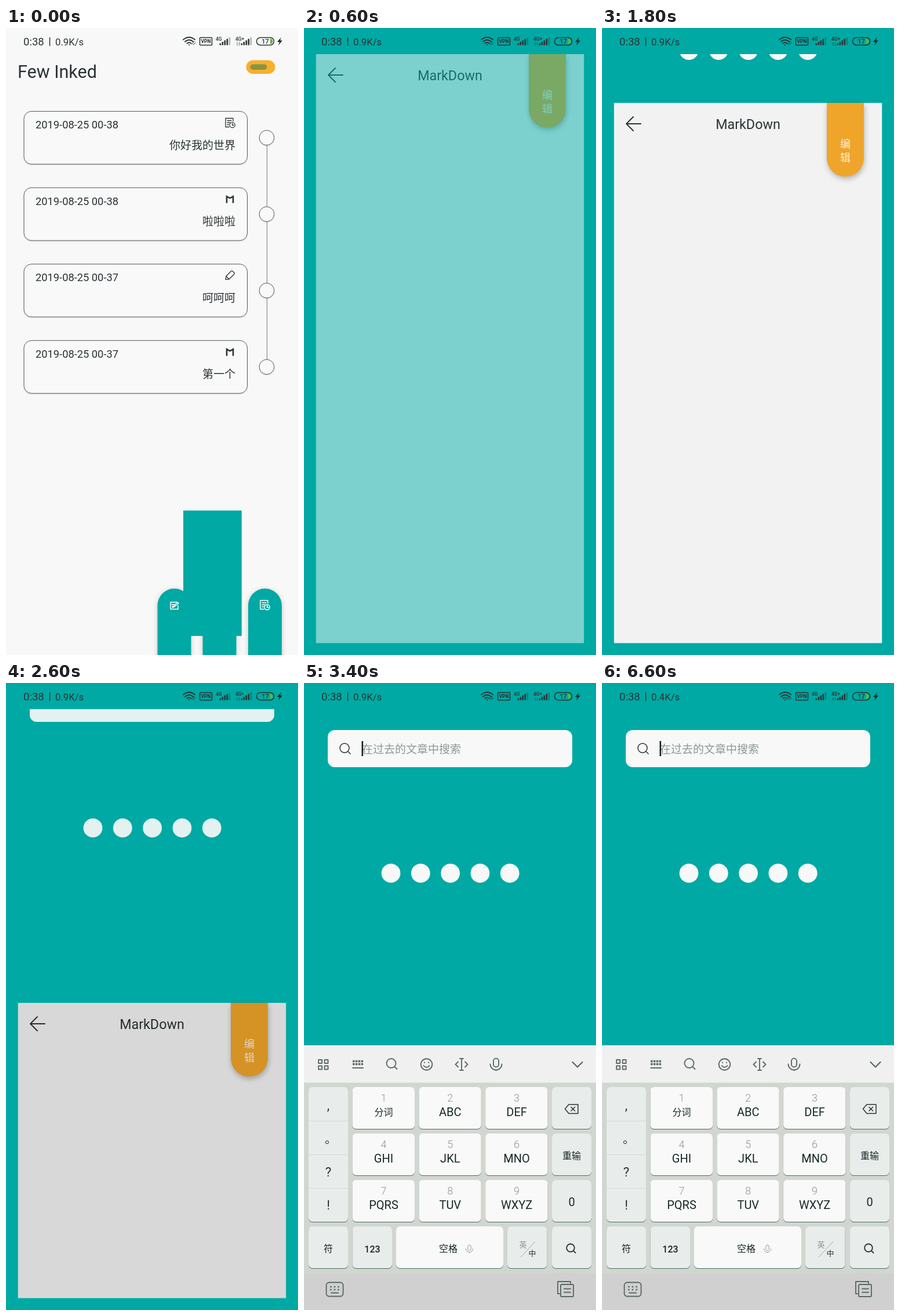
An HTML page that plays this animation: 504x1080 px, repeating every 6.8 s.

```html
<!DOCTYPE html>
<html lang="zh">
<head>
<meta charset="utf-8">
<title>Notes app</title>
<style>
  html, body { margin: 0; width: 100%; height: 100%; overflow: hidden; background: #f8f8f8; }
  svg { display: block; width: 504px; height: 1080px; }
  text { font-family: Roboto, "Noto Sans CJK SC", "Noto Sans CJK", sans-serif; fill: #2a3335; }
  .mid { text-anchor: middle; }
  .end { text-anchor: end; }
  .line { fill: none; stroke: #2a3335; stroke-width: 1.5; stroke-linecap: round; stroke-linejoin: round; }
  .white { stroke: #fff; }
  .teal { fill: #00a9a3; }
  .paper { fill: #f8f8f8; }
  .card { fill: #f9f9f9; stroke: #565c5b; stroke-width: 1; filter: drop-shadow(0 1px 1px #0002); }
  .pill { filter: drop-shadow(0 2px 4px #0003); }
  .tab { fill: #f4a92a; filter: drop-shadow(1px 4px 5px #0004); }
  .key { fill: #f9f9f9; filter: drop-shadow(0 1px .7px #4b706b); }
  .soft { fill: #e8ecea; }
  .digit { font-size: 18px; font-weight: 300; fill: #8d9392; }
  .label { font-size: 20px; fill: #152826; }
  .cjk { font-size: 16px; font-weight: 500; fill: #152826; }
  .tool { stroke: #5b6967; stroke-width: 1.9; }
</style>
</head>
<body>
<svg viewBox="0 0 504 1080">
  <defs>
    <clipPath id="below"><rect y="45" width="504" height="1035"/></clipPath>
    <clipPath id="frame"><rect x="20.5" y="45" width="463" height="1014.5"/></clipPath>
    <g id="todo">
      <path d="M14 6V1H1V16H7M4 5H11M4 8.500H9M4 12H6.500"/>
      <circle cx="12.700" cy="12.700" r="4.500"/>
      <path d="M12.700 10V13H15"/>
    </g>
    <path id="letter" d="M1 13V1.500L6.500 4.500L12 1.500V13" stroke-width="2.600" stroke-linecap="butt" stroke-linejoin="miter"/>
    <path id="pen" d="M1 16L2 10L10.500 1.500Q12 .5 13.500 2L15.500 4Q17 5.500 15.500 7L7 15.500ZM2 10L7 15.500"/>
    <g id="lens"><circle r="8"/><path d="M6 6L10 10"/></g>
    <g id="mic"><rect x="-4.500" y="-11" width="9" height="15" rx="4.500"/><path d="M-10 -1A10 10 0 0 0 10 -1M0 9V10"/></g>
  </defs>

  <rect class="paper" width="504" height="1080"/>
  <g id="home">
    <text x="20" y="86" font-size="30.500">Few Inked</text>
    <rect x="414.500" y="55.500" width="50" height="23.500" rx="11.750" fill="#fbae2b"/>
    <rect x="421.500" y="62.500" width="29" height="9.500" rx="4.750" fill="#879541"/>
    <path d="M450.500 189V584" stroke="#777c7b"/>
    <g id="cards"></g>
    <g class="teal">
      <rect class="pill" x="261.500" y="965.500" width="58" height="160" rx="29"/>
      <rect class="pill" x="339.500" y="965.500" width="58" height="160" rx="29"/>
      <rect class="pill" x="418" y="965.500" width="58" height="160" rx="29"/>
    </g>
    <path class="line white" d="M295 989H284V1001H297V995M287 998L296 989L298 991L289 998ZM286 993H290M287 996H289"/>
    <use href="#todo" class="line white" x="438" y="985"/>
  </g>

  <rect id="cover" class="teal" width="504" height="1080"/>

  <g clip-path="url(#below)">
    <g id="search">
      <rect class="paper" x="41" y="81" width="422" height="64" rx="12"/>
      <use href="#lens" class="line" x="70" y="112"/>
      <text x="100" y="120.500" font-size="19" style="fill:#8d9997">在过去的文章中搜索</text>
      <rect id="caret" x="99.500" y="100" width="2.600" height="26" fill="#17211f"/>
      <g id="dots" class="paper"></g>
    </g>
  </g>

  <g id="editor" clip-path="url(#frame)">
    <g id="page">
      <rect class="paper" x="20.500" y="45" width="463" height="1015"/>
      <path class="line" style="stroke-width:1.900" d="M67 81H42L54 69M42 81L54 93"/>
      <text class="mid" x="252" y="90" font-size="23.300">MarkDown</text>
      <path class="tab" d="M388 45H452V140A32 32 0 0 1 388 140Z"/>
      <g class="mid" font-size="18">
        <text x="420" y="122" style="fill:#fdf6e8">编</text>
        <text x="420" y="146" style="fill:#fdf6e8">辑</text>
      </g>
      <rect id="shade" x="20.500" y="45" width="463" height="1015"/>
    </g>
  </g>

  <g id="keyboard">
    <rect y="624" width="504" height="456" fill="#d2d6d0"/>
    <rect y="624" width="504" height="64.500" fill="#f0f0f0"/>
    <rect y="1017" width="504" height="63" fill="#d0d0d0"/>
    <g class="line tool">
      <path d="M25 649H31V655H25ZM35.500 649H41.500V655H35.500ZM25 659.500H31V665.500H25ZM35.500 659.500H41.500V665.500H35.500Z"/>
      <path d="M84 651.500H102M84 656.500H102" stroke-width="3.500" stroke-dasharray="3.500 1.350" stroke-linecap="butt"/>
      <path d="M84 663H102"/>
      <use href="#lens" x="150.500" y="655"/>
      <circle cx="211.500" cy="657" r="9.800"/>
      <path d="M208 653.500V654M215 653.500V654M206.500 659Q211.500 665 216.500 659"/>
      <path d="M269 647H275M272 647V667M269 667H275M266 652.500L261.500 657L266 661.500M278 652.500L282.500 657L278 661.500"/>
      <use href="#mic" x="331.500" y="657.500"/>
      <path d="M463.500 653L472 661.500L480.500 653" stroke-width="2.300"/>
      <rect x="38.500" y="1032.500" width="29" height="24" rx="5"/>
      <path d="M45 1040H61M45 1045H61" stroke-width="2.600" stroke-dasharray="2.600 4" stroke-linecap="butt"/>
      <path d="M47 1050.500H59"/>
      <path d="M441 1052H438V1031H460V1034"/>
      <rect x="443" y="1036" width="22" height="21" rx="2"/>
      <path d="M449 1043.500H460M449 1049.500H460"/>
    </g>
    <g id="keys"></g>
    <path d="M8 754.500H76M8 812.500H76M8 870.500H76" stroke="#d3d9d6"/>
    <g class="mid" font-size="22">
      <text x="42" y="735">,</text>
      <text x="46" y="793" font-size="20">。</text>
      <text x="42" y="850">?</text>
      <text x="42" y="907">!</text>
    </g>
    <path class="line" stroke-width="1.800" d="M450.500 733.500L457 726H473V741.500H457ZM461 730.500L467.500 737M467.500 730.500L461 737"/>
    <use href="#mic" class="line" style="stroke:#8d9392" transform="translate(285.500 975) scale(.62)"/>
    <path d="M374 989L399 962" stroke="#a3a8a6"/>
    <text class="mid" x="378" y="972" font-size="13" style="fill:#8d9392">英</text>
    <text class="mid" x="394" y="987" font-size="13" font-weight="500">中</text>
    <use href="#lens" class="line" style="stroke-width:2.200" transform="translate(460 973) scale(.85)"/>
  </g>

  <g id="status">
    <text x="30" y="29.500" font-size="18.500">0:38</text>
    <path d="M75.500 16V31" stroke="#2a3335" stroke-width="1.500"/>
    <text id="speed" x="85" y="29.500" font-size="16.700"></text>
    <g class="line">
      <path stroke-width="2" d="M306 20Q316 12 326 20M309 23.500Q316 17.500 323 23.500M312.500 26.500Q316 23.500 319.500 26.500M316 29V29.200"/>
      <path stroke-width="1" d="M321 28L325 23M323.500 29L327 25"/>
      <rect x="334.500" y="16.500" width="21" height="13" rx="1"/>
      <rect x="432.500" y="16.500" width="30" height="13" rx="6.500"/>
    </g>
    <text class="mid" x="345" y="26.200" font-size="8.500" font-weight="700">VPN</text>
    <text x="362" y="21.500" font-size="8.500" font-weight="500">4G</text>
    <text x="396" y="21.500" font-size="8.500" font-weight="500">4G+</text>
    <g id="bars" fill="#2a3335"></g>
    <path d="M399 25V30M402.500 25V30" stroke="#2a3335" stroke-dasharray="2 1"/>
    <path d="M456 18.500A4.500 4.500 0 0 1 456 27.500Z" fill="#62b82e"/>
    <text class="mid" x="447.500" y="27" font-size="11" font-weight="500">17</text>
    <path d="M475 16L468 24H472L470 30L477 21.500H473Z" fill="#202829"/>
  </g>
</svg>

<script>
const LOOP = 6800, STEP = 200;
const el = id => document.getElementById(id);
const fill = (id, items, draw) => el(id).innerHTML = items.map(draw).join('');

fill('cards', [
  ['38', '你好我的世界', 'todo', 378, 154.5],
  ['38', '啦啦啦', 'letter', 380, 157],
  ['37', '呵呵呵', 'pen', 378, 154],
  ['37', '第一个', 'letter', 380, 157]
], ([minute, note, icon, x, y], i) => `<g transform="translate(0 ${i * 131.6})">
  <rect class="card" x="31" y="143.5" width="385.5" height="91" rx="13"/>
  <text x="51" y="173" font-size="18.3">2019-08-25 00-${minute}</text>
  <use href="#${icon}" class="line" style="stroke-width:${icon === 'letter' ? 2.6 : 1.3}" x="${x}" y="${y}"/>
  <text class="end" x="396" y="208.500" font-size="19">${note}</text>
  <circle class="card" cx="450" cy="189" r="12.8"/></g>`);

fill('dots', [0, 1, 2, 3, 4], i => `<circle cx="${150 + i * 51.3}" cy="327.7" r="16.400"/>`);

fill('bars', [368.5, 405.5], x => [0, 1, 2, 3, 4].map(i =>
  `<rect x="${x + i * 4}" y="${26.5 - i * 2.6}" width="2.600" height="${3 + i * 2.6}" opacity="${i > 3 ? .35 : 1}"/>`).join(''));

const key = (x, y, w, h = 72, soft = true) =>
  `<rect class="key ${soft ? 'soft' : ''}" x="${x}" y="${y}" width="${w}" height="${h}" rx="6.5"/>`;
const label = (x, y, text, kind) => `<text class="mid ${kind}" x="${x}" y="${y}">${text}</text>`;

const letters = ['分词', 'ABC', 'DEF', 'GHI', 'JKL', 'MNO', 'PQRS', 'TUV', 'WXYZ'];
fill('keys', letters, (text, i) => {
  const x = 83.5 + i % 3 * 114.8, y = 696 + Math.floor(i / 3) * 80;
  return key(x, y, 107.5, 72, false) + label(x + 54, y + 25, i + 1, 'digit')
    + label(x + 54, y + (i ? 50 : 48.5), text, i ? 'label' : 'cjk');
});
el('keys').innerHTML += key(8, 696, 68, 232)
  + [696, 776, 856, 936].map(y => key(428, y, 68)).join('')
  + key(8, 936, 68) + key(83.5, 936, 68.5) + key(159, 936, 185, 72, false) + key(351, 936, 68.5)
  + label(462, 820, '重输', 'cjk') + label(462, 901, '0', 'label')
  + label(42, 980, '符', 'cjk') + label(118, 980.5, '123', 'cjk') + label(249, 980, '空格', 'cjk');

// Linear interpolation through [time, value] points
function track(t, points) {
  const i = points.findIndex(p => p[0] > t);
  if (i === 0) return points[0][1];
  if (i < 0) return points[points.length - 1][1];
  const [t0, a] = points[i - 1], [t1, b] = points[i];
  return a + (b - a) * (t - t0) / (t1 - t0);
}

const move = (id, x, y, scale = 1) => el(id).setAttribute('transform', `translate(${x} ${y}) scale(${scale})`);
const opacity = (id, value) => el(id).setAttribute('opacity', value);

function draw(t) {
  const grow = track(t, [[0, .2], [200, .76], [400, 1]]);
  move('cover', 382.5 * (1 - grow), 1039 * (1 - grow), grow);

  // The search panel follows the pulled page at half speed
  const pull = track(t, [[1600, 0], [1800, 84], [2600, 506], [2800, 625], [3000, 662]]);
  move('page', 0, pull);
  move('search', 0, (pull - 662) / 2);
  opacity('editor', track(t, [[400, 0], [800, 1]]));
  opacity('shade', pull * .13 / 506);
  opacity('search', t < 400 ? 0 : track(t, [[1800, 1], [2600, .92], [3000, 1]]));

  move('keyboard', 0, track(t, [[2600, 456], [2800, 380], [3000, 90], [3200, 0]]));
  opacity('caret', t >= 3000 && (t + 750) % 1000 < 500 ? 1 : 0);
  el('speed').textContent = t < 4200 ? '0.9K/s' : '0.4K/s';
}

function tick() {
  const now = (performance.now() + 8) % LOOP;
  draw(Math.floor(now / STEP) * STEP);
  requestAnimationFrame(tick);
}
tick();
</script>
</body>
</html>
```
